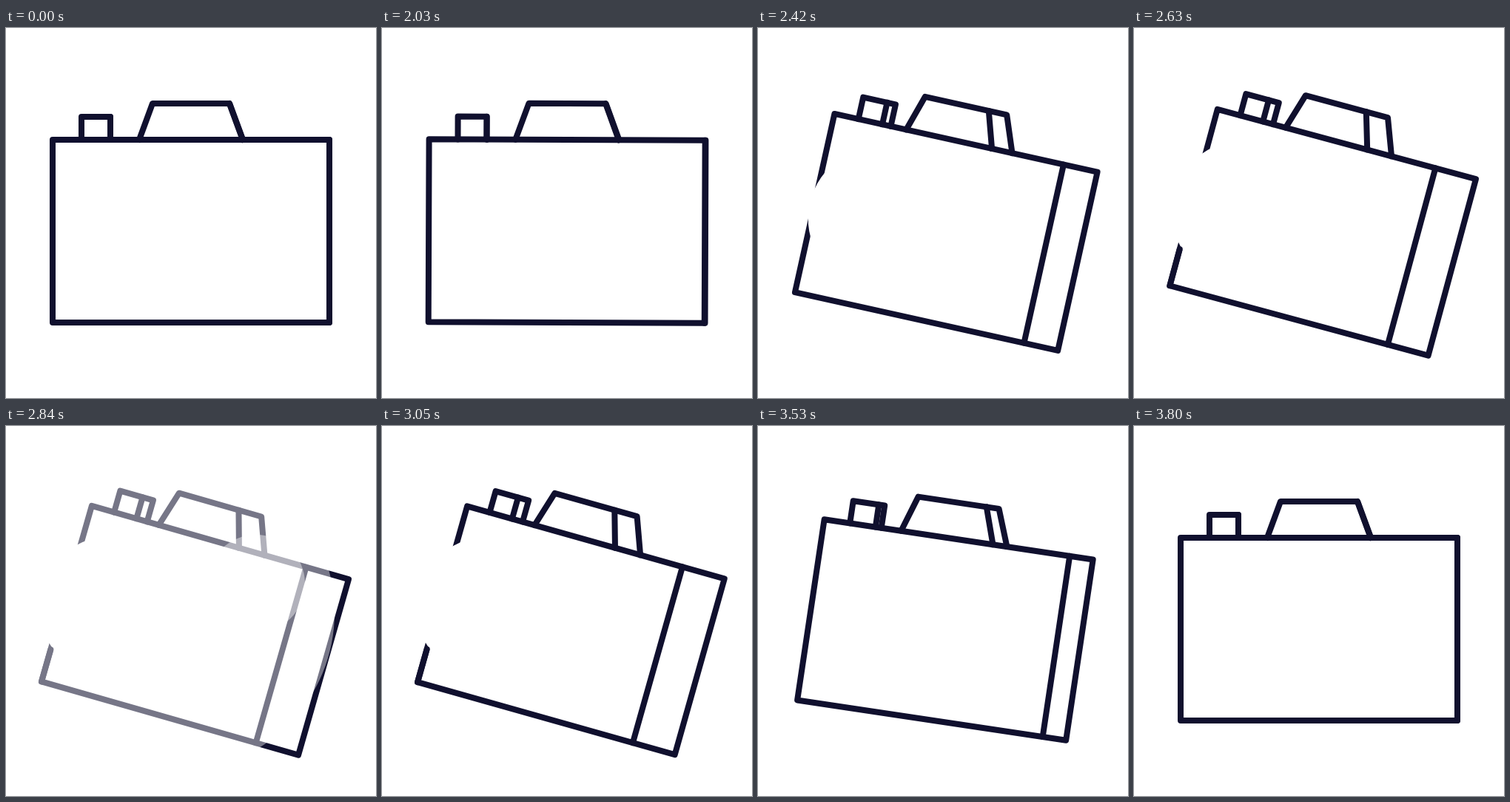
An HTML page with a canvas for the animation above (3.83 s loop, 500 by 500 pixels).

```html
<!DOCTYPE html>
<html lang="en">
<head>
<meta charset="utf-8">
<title>Camera turn</title>
<style>
  html, body { margin: 0; width: 100%; height: 100%; overflow: hidden; background: #fff; }
  canvas { display: block; }
</style>
</head>
<body>
<canvas id="stage" width="500" height="500"></canvas>
<script>
const ctx = document.getElementById('stage').getContext('2d');
const LOOP = 3830, START = 2000, HALF = 900, STEP = 30;
const HEIGHT = 247, LENS_R = 97, MID = 125;

// Cubic bezier easing (.25, .05, .2, 1), solved by bisection.
function ease(x) {
  if (x <= 0) return 0;
  if (x >= 1) return 1;
  const curve = (a, b, s) => 3 * a * s * (1 - s) ** 2 + 3 * b * s * s * (1 - s) + s ** 3;
  let lo = 0, hi = 1;
  for (let i = 0; i < 30; i++) {
    const s = (lo + hi) / 2;
    if (curve(.25, .2, s) < x) lo = s; else hi = s;
  }
  return curve(.05, 1, lo);
}

function line(...points) {
  ctx.beginPath();
  points.forEach(([x, y]) => ctx.lineTo(x, y));
  ctx.stroke();
}

function disc(x, y, r) {
  ctx.beginPath();
  ctx.arc(x, y, r, 0, 2 * Math.PI);
  ctx.fill();
}

function drawCamera(p) {
  const width = 374 - 13 * p;
  const front = x => x * (1 - .195 * p);
  const back = (x, depth) => front(x) + depth * p;

  ctx.save();
  ctx.translate(250 + 5.5 * p, 274.5 + 1.8 * p);
  ctx.rotate(16 * p * Math.PI / 180);
  ctx.translate(-width / 2, -HEIGHT / 2);

  // Body and its side face
  line([0, 0], [width, 0], [width, HEIGHT], [0, HEIGHT], [0, 0]);
  line([front(374), 0], [front(374), HEIGHT]);

  // Shutter button
  line([front(39), 0], [front(39), -31 + p], [back(78, 15), -31 + p], [back(78, 15), 0]);
  line([front(78), 0], [front(78), -31 + p]);

  // Viewfinder hump
  line([front(117), 0], [front(135), -49], [back(239, 32), -49], [back(257, 36), 0]);
  line([front(239), -49], [front(257), 0]);

  // White lens sliding over the left edge
  const lensX = 187 - 123.5 * p;
  disc(lensX, MID, LENS_R);
  const chord = Math.sqrt(Math.max(0, LENS_R ** 2 - lensX ** 2));
  if (chord > 45) line([0, MID + chord + 4], [0, HEIGHT]);
  ctx.restore();
}

function drawFlash(t) {
  const phase = (t - 2750) / 300;
  if (phase <= 0 || phase >= 1) return;
  ctx.globalAlpha = .53 * Math.sin(Math.PI * phase);
  disc(229, 252, 215);
  disc(338, 213, 66);
  ctx.globalAlpha = 1;
}

function draw(now) {
  const t = START + Math.floor((now % LOOP - START) / STEP) * STEP;
  const turn = 1 - Math.abs(t - START - HALF) / HALF;
  ctx.fillStyle = '#fff';
  ctx.fillRect(0, 0, 500, 500);
  ctx.strokeStyle = '#10102e';
  ctx.lineWidth = 8;
  ctx.lineCap = ctx.lineJoin = 'round';
  drawCamera(ease(turn));
  drawFlash(t);
  requestAnimationFrame(draw);
}
requestAnimationFrame(draw);
</script>
</body>
</html>
```
